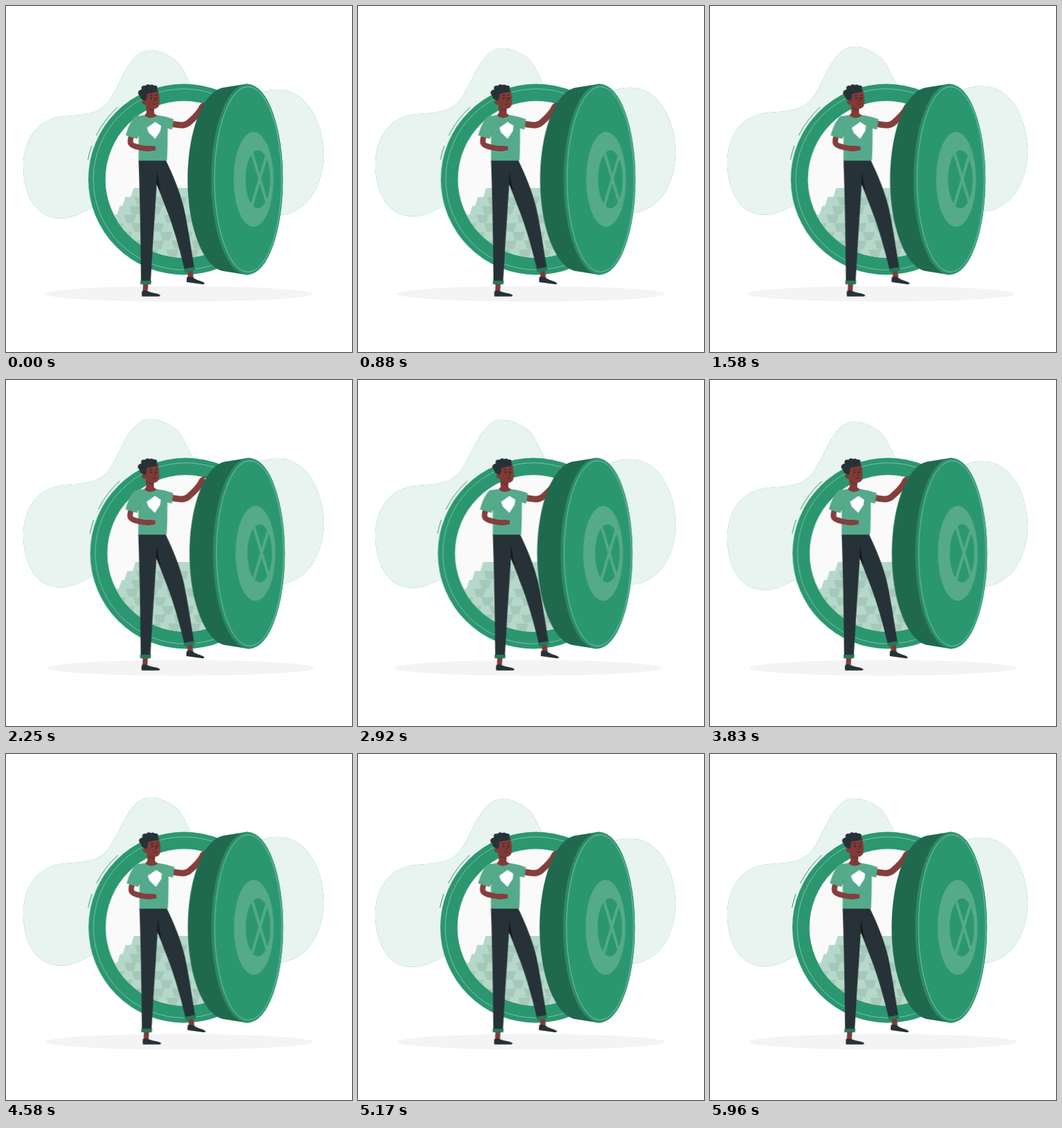
An HTML page without scripts that plays this animation: 500x500 px, repeating every 6000 ms.

```html
<!DOCTYPE html>
<html lang="en">
<head>
<meta charset="utf-8">
<title>Open vault</title>
<style>
  html, body { margin: 0; width: 100%; height: 100%; overflow: hidden; background: #fff; }
  svg { display: block; width: 100vw; height: 100vh; }
  .float { animation: float 6s linear -.55s infinite; }
  .vault { animation: shake 6s linear -.05s infinite; }
  .man { animation: shake 6s linear -.55s infinite; }
  @keyframes float {
    50% { transform: translateY(-10px); }
  }
  @keyframes shake {
    0%, 100% { transform: translateX(0); }
    10%, 90% { transform: translateX(-1px); }
    20%, 80% { transform: translateX(2px); }
    30%, 50%, 70% { transform: translateX(-4px); }
    40%, 60% { transform: translateX(4px); }
  }
  .green { fill: #2b9770; }
  .deep { fill: #1f6a4e; }
  .mint { fill: #55aa8c; }
  .ink { fill: #263238; }
  .skin { fill: #7f3b37; }
  .line { fill: none; stroke: #95cbb7; stroke-width: .8; }
  .arm { fill: none; stroke: #843f3c; stroke-linecap: round; stroke-linejoin: round; }
</style>
</head>
<body>
<svg viewBox="0 0 500 500" xmlns="http://www.w3.org/2000/svg">
  <defs>
    <path id="blob" d="M25 232C25 196 44 163 83 159.500C110 157 134 158 149 137C167 112 178 64 209 64C222 64 236 72 244 77.500C256 87 259 101 266 112C276 132 284 146 310 146C340 146 358 121 393 121C437 121 459 172 459 214C459 258 437 297 399 302C350 306 310 270 250 270C180 270 150 280 125 291C108 300 96 307 78 307C42 307 25 270 25 232Z"/>
    <path id="gap" d="M-9 0H9L5 12H-5Z"/>
    <g id="gaps">
      <use href="#gap"/><use href="#gap" x="29"/><use href="#gap" x="58"/>
      <use href="#gap" x="87"/><use href="#gap" x="116"/>
    </g>
    <clipPath id="hole"><circle cx="257.500" cy="250.500" r="113.300"/></clipPath>
    <clipPath id="pile"><path d="M185 263H330V370H130V339L138 326H145L149 314H153L157 301.500H161L165 289H169L173 276H177L181 276Z"/></clipPath>
  </defs>

  <g class="float">
    <g transform="translate(0 1.8)">
      <use href="#blob" class="green"/>
      <use href="#blob" fill="#fff" fill-opacity=".89"/>
    </g>
  </g>

  <g class="vault">
    <ellipse cx="249.500" cy="416" rx="193.500" ry="11.300" fill="#f4f4f4"/>
    <g transform="translate(-.5 0)">
      <circle class="green" cx="257.500" cy="250.500" r="138"/>
      <circle class="line" cx="257.500" cy="250.500" r="130.800"/>
      <circle cx="257.500" cy="250.500" r="113.300" fill="#fafafa"/>
      <g clip-path="url(#hole)">
        <g clip-path="url(#pile)">
          <path fill="#b5d8cb" d="M120 263H340V370H120Z"/>
          <g fill="#a5c8bb">
            <use href="#gaps" x="195" y="276"/>
            <use href="#gaps" x="188" y="289"/>
            <use href="#gaps" x="180" y="301.500"/>
            <use href="#gaps" x="162" y="314"/>
            <use href="#gaps" x="174" y="326.500"/>
            <use href="#gaps" x="191" y="339"/>
            <use href="#gaps" x="183" y="352"/>
          </g>
        </g>
      </g>
      <path d="M162 146A141.500 141.500 0 0 0 131 187M124.500 202A141.500 141.500 0 0 0 119 222" fill="none" stroke="#2b9770"/>
    </g>
  </g>

  <g class="man">
    <g transform="translate(.5 0)">
      <!-- feet -->
      <path class="skin" d="M198.500 401H206L205 413H198ZM262.500 383L270 382L271.500 393L263.500 393Z"/>
      <path d="M205 412L208 410.500L210 414M270.500 391.500L273 390L275 394" fill="none" stroke="#c3dfd5" stroke-width=".8"/>
      <path class="ink" d="M197 412C200 410.500 203 411 205 412C211 415.500 218 414 223 417.500Q223.500 419.500 221 419.800H197Q196 416 197 412ZM262 391.500C265 390.500 268 391 271 392.500C276 397 283 396.500 287.500 400.500Q287.500 402.500 285 402.300L261.500 399Q261 395 262 391.500Z"/>
      <!-- legs -->
      <path class="ink" d="M206 223H231.500C241 243 251 266 257.500 292C264 322 268 352 272.500 378L258.500 381C253 358 246 332 236.500 305C230 288 224 272 218 258Z"/>
      <path class="ink" d="M192 223H222C219.500 240 218 262 216.500 284C214 322 211.500 360 209.500 398H195.500C195 340 194 280 192 223Z"/>
      <path d="M219 240Q220 254 224 268Q219 260 217.800 254Z" fill="#11191d"/>
      <path fill="#24795a" d="M194.500 397H210.500L209.800 402.300H194.800ZM257.500 380L272.800 377L274 382L259 385Z"/>
      <!-- raised arm -->
      <path class="arm" stroke-width="9" d="M238 170C250 172 258 174 264 169C271 163 278 157 283 148"/>
      <path fill="#843f3c" d="M278.500 150C278 145 281 141 285 140L290.500 138.800Q291.500 140 288 142L288.500 146L285 152Z"/>
      <!-- torso -->
      <path class="mint" d="M201 157.500L187.500 159.500L192 186V223.500H233C234 206 234 191 234 177L240.500 178.500L242.500 163.500Q230 159 218.500 157.500Z"/>
      <path fill="#fff" d="M204 176L216 167.500L224.500 173L223.500 180.500L216 192L206.500 183Z"/>
      <!-- bent arm -->
      <path class="arm" stroke-width="8" d="M181.500 188C178.500 198 180 201 188 203C195 205 201 206 206 206"/>
      <path fill="#843f3c" d="M204 203L210 202L216.500 203V208.500L209 209.800H204Z"/>
      <path class="mint" d="M187.500 159.500C181 165 176 177 173.500 187L189.500 192L196 178V160Z"/>
      <path d="M189.500 192L195 180" stroke="#43957a" stroke-width=".8"/>
      <!-- head -->
      <path class="skin" d="M202 140L203.500 154Q201 157 201 158.500Q209 165 218.500 158.500L214.500 155V146Z"/>
      <path d="M204 146Q209 150 214.500 148.500V151Q207 152 204 146Z" fill="#6d312e"/>
      <path class="skin" d="M202 124L220 121C222.500 130 223 140 221 145C218 149.500 211 149.500 207 146.500L202 142.500Q197 143 197 138.500Q198 135 201 136Z"/>
      <g class="ink">
        <path d="M195 121L218 118L219.500 124Q212 125 204.500 127L203 136.500H200Q193 133 193 126Z"/>
        <circle cx="195.500" cy="125.500" r="4.200"/><circle cx="198.500" cy="131" r="4.200"/>
        <circle cx="200" cy="119" r="4"/><circle cx="205.500" cy="117" r="3.700"/>
        <circle cx="211" cy="117" r="3.500"/><circle cx="215.500" cy="118.500" r="3.700"/>
      </g>
      <path d="M208 130Q210 128.500 212 129.500M216 129.500L219 129" fill="none" stroke="#2c1b1d" stroke-width=".9"/>
      <path fill="#2c1b1d" d="M209.500 132H211V134.500H209.500ZM217 132H218.500V134.500H217Z"/>
      <path d="M214.500 132L216.500 137L214 137.500M212 141.500Q215 143 218 141" fill="none" stroke="#4f201f" stroke-width=".8"/>
    </g>
  </g>

  <!-- door -->
  <g class="vault">
    <g transform="translate(-.5 0)">
      <path class="deep" d="M349 112.500L314 118C285 124 263 182 263 250.500C263 319 285 377 314 383L349 388.500Z"/>
      <ellipse cx="348.800" cy="250.500" rx="51.900" ry="138" fill="#2a8a67"/>
      <ellipse class="green" cx="351" cy="250.500" rx="49.700" ry="137"/>
      <ellipse class="line" cx="350.300" cy="250.500" rx="48.500" ry="133.800"/>
      <ellipse class="mint" cx="358.300" cy="250.500" rx="28.800" ry="68.500"/>
      <ellipse class="green" cx="364.500" cy="250.500" rx="17.800" ry="42"/>
      <path d="M356 212L379 289M378.500 212L355.500 289" fill="none" stroke="#55aa8c" stroke-width="4"/>
    </g>
  </g>
</svg>
</body>
</html>
```
